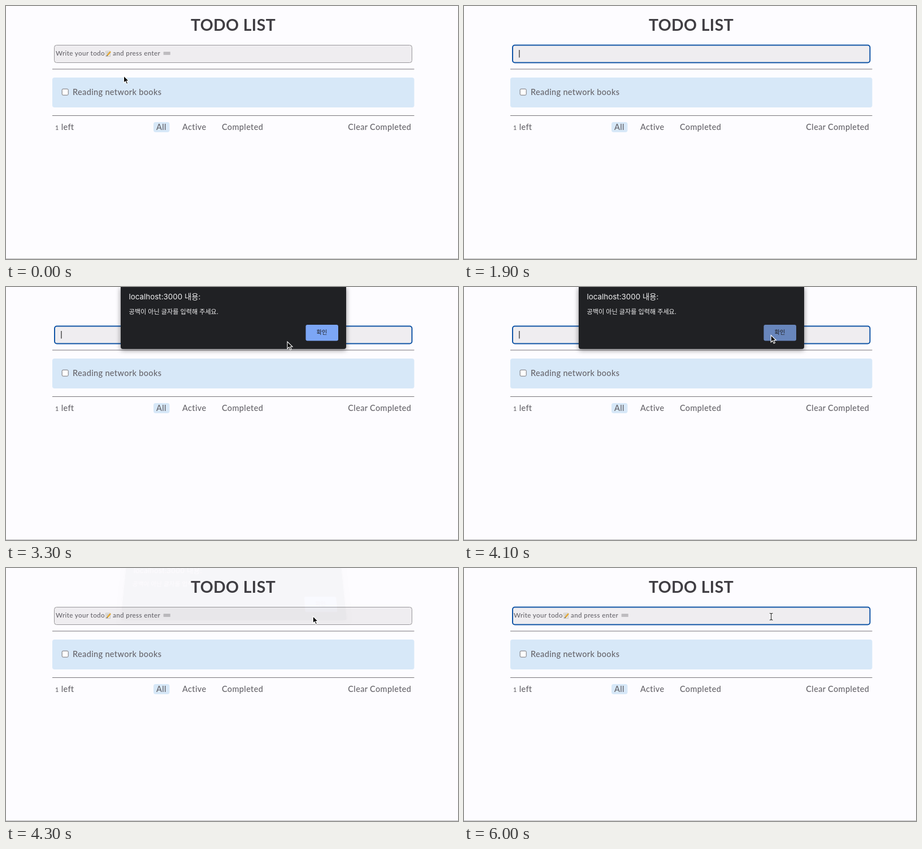
Animation of 800x449 px, one loop 6100 ms. Source, as an HTML page:

```html
<!DOCTYPE html>
<html lang="ko">
<head>
<meta charset="utf-8">
<title>Todo list</title>
<style>
  html, body { margin: 0; width: 100%; height: 100%; overflow: hidden; background: #fdfcff; }
  svg { position: absolute; left: 0; top: 0; }
  #page { font: 500 14.5px Lato, sans-serif; letter-spacing: .35px; fill: #66646a; }
  #placeholder { font-size: 11.6px; letter-spacing: .38px; }
  #dialog {
    left: 202.5px; background: #202124; border-radius: 0 0 4px 4px;
    box-shadow: 0 2px 8px #0007; transform-origin: 50% 100%;
    font: 500 11.1px "Noto Sans CJK KR", "Noto Sans CJK", sans-serif; fill: #f1f1f2;
  }
</style>
</head>
<body>
<svg id="page" width="800" height="449">
  <text x="402" y="43.5" text-anchor="middle" font-size="28.5" font-weight="700" fill="#403e43">TODO LIST</text>
  <rect id="field" y="69.5" height="31" rx="4" fill="#efedf0"/>
  <g id="placeholder">
    <text x="88" y="88.3">Write your todo</text>
    <g stroke-width=".6">
      <path d="M176.5 80h8v9.5h-8z" fill="#e8e6e4" stroke="#b5b2b0"/>
      <path d="M178 82.500h5M178 84.500h4" stroke="#999"/>
      <path d="M179 88l6-7" stroke="#e5a62c" stroke-width="2.400"/>
      <path d="M178 89l1.500-2" stroke="#555" stroke-width="1.200"/>
    </g>
    <text x="189" y="88.3">and press enter</text>
    <rect x="278.500" y="81" width="12.500" height="6" rx="1" fill="#c9c7ca"/>
    <path d="M279.500 82.800h10.500M279.500 85h10.500" stroke="#a5a3a7" stroke-dasharray="1.300 .5"/>
  </g>
  <rect id="caret" y="78" width="1.3" height="13.500" fill="#333"/>
  <path d="M82 112h640.500M82 194.500h640.500" stroke="#777579" stroke-width="1.100"/>
  <rect x="82" y="127" width="640.500" height="53" rx="4" fill="#d7e8f8"/>
  <rect x="99.200" y="147.200" width="11" height="11" rx="2" fill="#fff" stroke="#747377"/>
  <text x="118" y="158">Reading network books</text>
  <rect x="261" y="206" width="28.500" height="18" rx="4" fill="#d7e8f8"/>
  <text x="87" y="220"><tspan font-size="10.800">1</tspan> left</text>
  <text x="266" y="220">All</text>
  <text x="312" y="220">Active</text>
  <text x="382" y="220">Completed</text>
  <text x="717.300" y="220" text-anchor="end">Clear Completed</text>
  <path d="M0 448.500h800" stroke="#b9b8bb"/>
</svg>

<svg id="dialog" width="399.5" height="109.5" viewBox="202.5 0 399.5 109.5">
  <text x="217" y="22" font-size="13.400" font-family="Inter, 'Noto Sans CJK KR', sans-serif" font-weight="400">localhost:3000 내용:</text>
  <text x="217" y="47.500">공백이 아닌 글자를 입력해 주세요.</text>
  <rect id="button" x="530" y="67" width="57.500" height="28.500" rx="3"/>
  <text x="558.500" y="84" text-anchor="middle" font-size="10.300" fill="#202124">확인</text>
</svg>

<svg id="pointer" width="800" height="449">
  <path id="arrow" d="M0 0v12.500l2.900-2.700 2.100 4.700 2.200-1-2.100-4.500h4z" stroke="#fff" stroke-width="1.100"/>
  <g id="beam" fill="none" stroke-linecap="round">
    <path d="M-2.500-6q2.500 0 2.500 1.500v9q0 1.500-2.500 1.500M2.500-6q-2.500 0-2.500 1.500v9q0 1.500 2.500 1.500" stroke="#fff" stroke-width="2.500"/>
    <path d="M-2.500-6q2.500 0 2.500 1.500v9q0 1.500-2.500 1.500M2.500-6q-2.500 0-2.500 1.500v9q0 1.500 2.500 1.500" stroke="#222" stroke-width="1.100"/>
  </g>
</svg>

<script>
const LOOP = 6100, STEP = 100;
const CLICK = 800, TYPE = 1200, OPEN = 2200, MOVE = 2900, CLOSE = 4200, REFOCUS = 4400;
// time, x, y of the pointer
const PATH = [
  [200, 208.5, 124], [700, 212, 94.5], [2800, 212, 94.5],
  [3300, 498, 97], [3600, 524, 91], [3900, 543.3, 85.5]
];
const el = id => document.getElementById(id);
const set = (id, attrs) => {
  for (const name in attrs) el(id).setAttribute(name, attrs[name]);
};
const show = (id, on) => { el(id).style.display = on ? '' : 'none'; };

function pointerAt(t) {
  const next = PATH.findIndex(p => p[0] > t);
  if (next === 0) return PATH[0].slice(1);
  if (next < 0) return PATH[PATH.length - 1].slice(1);
  const [t0, x0, y0] = PATH[next - 1], [t1, x1, y1] = PATH[next];
  const k = (t - t0) / (t1 - t0);
  return [x0 + (x1 - x0) * k, y0 + (y1 - y0) * k];
}

function drawField(t) {
  const focused = t >= CLICK && t < CLOSE || t >= REFOCUS;
  const spaces = t < TYPE || t >= CLOSE ? 0 : t < 1400 ? 1 : t < 1600 ? 2 : 3;
  const blinkOn = t < REFOCUS || (t - REFOCUS) % 1000 < 500;
  set('field', {
    x: focused ? 86 : 85.5, width: focused ? 632.5 : 633,
    stroke: focused ? '#1155a6' : '#98969a', 'stroke-width': focused ? 2 : 1
  });
  set('caret', { x: 88 + spaces * 3.1 });
  show('caret', focused && blinkOn);
  show('placeholder', !spaces);
}

function drawDialog(t, x, y) {
  const dialog = el('dialog');
  const leaving = Math.max(0, Math.min(1, (t - CLOSE + STEP) / (2 * STEP)));
  const hovered = x > 530 && y > 67 && y < 95.5;
  show('dialog', t >= OPEN && t < REFOCUS);
  dialog.style.opacity = 1 - leaving * .965;
  dialog.style.transform = leaving
    ? `translateY(${-17.5 * leaving}px) perspective(270px) rotateX(${8 * leaving}deg)` : 'none';
  set('button', { fill: hovered && t < CLOSE ? '#6886bc' : '#7ca6f5' });
}

function drawPointer(t, x, y) {
  const beam = t < TYPE && y < 101 || t >= REFOCUS;
  show('pointer', t < TYPE || t >= MOVE);
  show('beam', beam);
  show('arrow', !beam);
  set('arrow', { transform: `translate(${x} ${y})` });
  set('beam', { transform: `translate(${x + .4} ${y + .8})` });
}

function frame() {
  const t = Math.floor(performance.now() % LOOP / STEP) * STEP;
  const [x, y] = pointerAt(t);
  drawField(t);
  drawDialog(t, x, y);
  drawPointer(t, x, y);
  requestAnimationFrame(frame);
}
frame();
</script>
</body>
</html>
```
